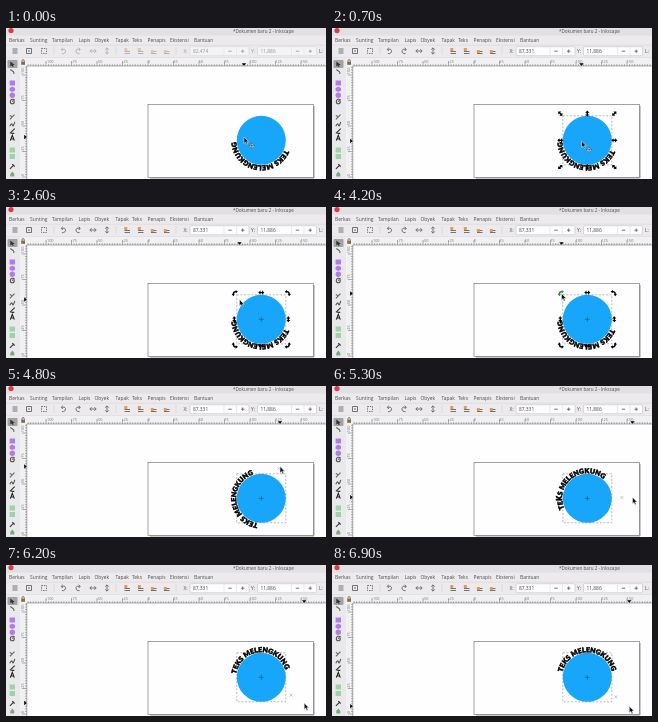
An HTML page for the animation above (7000 ms loop, 320 px wide and 151 px high).

```html
<!DOCTYPE html>
<html lang="id">
<head>
<meta charset="utf-8">
<title>Teks melengkung</title>
<style>
html, body { margin: 0; width: 100%; height: 100%; overflow: hidden; background: #fff; }
svg { display: block; width: 100vw; height: 100vh; }
text { font-family: "Open Sans", "Noto Sans", sans-serif; font-size: 4.9px; fill: #4c4c4c; }
.tiny { font-size: 3.8px; fill: #777; }
.ico { fill: none; stroke: #666; stroke-width: .9; }
.curve { font-family: Lato, sans-serif; font-weight: 900; font-size: 6.9px; fill: #000; stroke: #000; stroke-width: .5; }
</style>
</head>
<body>
<svg id="stage" viewBox="0 0 320 151" preserveAspectRatio="none">
  <rect width="320" height="151" fill="#fefdff"/>

  <g id="page">
    <path d="M308 78V150H144" fill="none" stroke="#999" stroke-width="1"/>
    <rect x="142" y="76.3" width="165.3" height="73" fill="#fefdff" stroke="#666" stroke-width=".6"/>
  </g>

  <circle cx="255.3" cy="112.3" r="24.5" fill="#18a6fb"/>
  <path id="ring" fill="none" d="M280.4 112.3A25.1 25.1 0 0 1 230.2 112.3A25.1 25.1 0 0 1 280.4 112.3"/>
  <g id="label"><text class="curve"><textPath href="#ring">TEKS MELENGKUNG</textPath></text></g>

  <g id="selection">
    <rect x="230.8" y="87.8" width="49" height="49" fill="none" stroke="#777" stroke-width=".5" stroke-dasharray="2 1.6"/>
    <g id="scale"></g>
    <g id="rotate"></g>
    <path id="pivot" d="M252.8 112.3h5M255.3 109.8v5" stroke="#174e75" stroke-width=".6"/>
  </g>
  <path id="snap" d="M-1.5-1.5l3 3M1.5-1.5l-3 3" stroke="#cba5ad" stroke-width=".7"/>

  <g id="chrome">
    <rect width="320" height="30" fill="#eceaed"/>
    <rect width="320" height="7.5" fill="#e2e0e3"/>
    <path d="M0 17.2H320M0 29.7H320" stroke="#d8d6d9" stroke-width=".6"/>
    <circle cx="5" cy="2.6" r="2.6" fill="#dc3b45"/>
    <text x="227" y="4.6" style="font-size:4.55px">*Dokumen baru 2 - Inkscape</text>
    <g id="menu"></g>
    <rect y="30" width="14" height="121" fill="#e9e8ea"/>
    <rect x="14" y="30" width="306" height="8" fill="#f1f0f2"/>
    <rect x="14" y="38" width="7" height="113" fill="#f1f0f2"/>
    <path d="M20.8 151V38H320" fill="none" stroke="#777" stroke-width=".6"/>
    <g id="rulers"></g>
    <rect x="15.2" y="33.8" width="3.8" height="3" fill="#8a6a35"/>
    <path d="M16 34v-1.3a1.1 1.1 0 0 1 2.2 0V34" class="ico"/>
    <g id="bar"></g>
    <g id="tools"></g>
    <path id="markX" d="M-2.2 35.3h4.4L0 37.8z"/>
    <path id="markY" d="M18.2-2.2v4.4L20.7 0z"/>
  </g>

  <g id="cursor">
    <path d="M0 0V6.4L1.5 5.1 2.6 7.4 3.7 6.9 2.7 4.7H4.7z" fill="#111" stroke="#eee" stroke-width=".55"/>
    <g id="move" fill="none">
      <path d="M5 8.7h5.4M7.7 6v5.4" stroke="#fff" stroke-width="1.5"/>
      <path d="M5 8.7h5.4M7.7 6v5.4M7 6.7l.7-.8.7.8M7 10.7l.7.8.7-.8M5.7 8l-.8.7.8.7M9.7 8l.8.7-.8.7" stroke="#222" stroke-width=".6"/>
    </g>
  </g>
</svg>

<script>
const NS = 'http://www.w3.org/2000/svg';
const $ = id => document.getElementById(id);
const LOOP = 7000, STEP = 100;
const CX = 255.3, CY = 112.3, CORNER = 34.6, TEXT_START = 22;
const SELECT = 600, TURN = 1400, GRAB = 4200;

function add(parent, tag, attrs, content) {
  const el = document.createElementNS(NS, tag);
  for (const k in attrs) el.setAttribute(k, attrs[k]);
  if (content !== undefined) el.textContent = content;
  parent.appendChild(el);
  return el;
}
const icon = (parent, x, y, d, attrs = {}) =>
  add(parent, 'path', { class: 'ico', d, transform: `translate(${x} ${y})`, ...attrs });

function buildMenu() {
  const items = { Berkas: 3, Sunting: 24, Tampilan: 46, Lapis: 72.5, Obyek: 88.5,
    Tapak: 109.5, Teks: 126, Penapis: 141.5, Ekstensi: 164, Bantuan: 188 };
  for (const name in items) add($('menu'), 'text', { x: items[name], y: 14 }, name);
}

function buildRulers() {
  const g = $('rulers'), unit = 1.02;
  let d = '';
  for (let mm = -117.5; mm <= 175; mm += 2.5) {
    const x = 142 + mm * unit;
    d += `M${x} 38v${mm % 25 ? -1.8 : -5}`;
    if (mm % 25 === 0) add(g, 'text', { x: x - .2, y: 35, class: 'tiny' }, mm);
  }
  for (let mm = 0; mm <= 107.5; mm += 2.5) {
    const y = 149 - mm * unit;
    d += `M20.8 ${y}h${mm % 25 ? -1.8 : -5}`;
    if (mm % 25 === 0)
      add(g, 'text', { class: 'tiny', transform: `translate(18 ${y - .8}) rotate(-90)` }, mm);
  }
  add(g, 'path', { d, stroke: '#666', 'stroke-width': .5 });
}

let actions, fieldX, fieldY;
function buildBar() {
  const bar = $('bar');
  icon(bar, 9, 23, 'M-2.5-2h5M-2.5 0h5M-2.5 2h5');
  icon(bar, 23, 23, 'M-2.5-2.5h5v5h-5zM-1 0h2');
  icon(bar, 38, 23, 'M-2.5-2.5h5v5h-5z', { 'stroke-dasharray': '1.4 1' });
  actions = add(bar, 'g', {});
  icon(actions, 57.5, 23, 'M-1.6 2.6H0Q2.4 2 2-.4T-2-1.6M-.7-3.2l-1.6 1.6 1.6 1.6');
  icon(actions, 72, 23, 'M1.6 2.6H0Q-2.4 2-2-.4T2-1.6M.7-3.2l1.6 1.6L.7 0');
  icon(actions, 87, 23, 'M-3 0H3M-1.4-1.8L-3.2 0l1.8 1.8M1.4-1.8L3.2 0 1.4 1.8');
  icon(actions, 101, 23, 'M0-3V3M-1.8-1.4L0-3.2l1.8 1.8M-1.8 1.4L0 3.2l1.8-1.8');
  [121, 134.5, 147.5, 160.5].forEach((x, i) => {
    icon(actions, x, 23, 'M-2.5 2.5h5.5M-2.5 .5h5.5');
    add(actions, 'rect', { x: x - 2.7, y: i < 2 ? 20 : 22, width: 3, height: 3, fill: '#e39a5c' });
  });
  add(bar, 'path', { d: 'M48 19v8M110 19v8M170 19v8', stroke: '#d2d0d3', 'stroke-width': .6 });
  const field = (name, x) => {
    const g = add(bar, 'g', {});
    add(g, 'text', { x: x - 6.5, y: 25 }, name);
    add(g, 'rect', { x, y: 18.7, width: 59, height: 9, rx: 1.2, fill: '#fcfbfd', stroke: '#c4c4c4', 'stroke-width': .6 });
    add(g, 'path', { d: `M${x + 34} 19v8.4M${x + 46.5} 19v8.4`, stroke: '#d8d8d8', 'stroke-width': .5 });
    icon(g, x + 40, 23.2, 'M-1.7 0h3.4');
    icon(g, x + 52.7, 23.2, 'M-1.7 0h3.4M0-1.7v3.4');
    return { g, value: add(g, 'text', { x: x + 3, y: 25 }, '11,886') };
  };
  fieldX = field('X:', 184);
  fieldY = field('Y:', 251.5);
  add(bar, 'text', { x: 313, y: 25 }, 'L:');
}

function buildTools() {
  const g = $('tools');
  const fill = c => ({ style: `fill:${c};stroke:none` });
  const line = c => ({ style: `stroke:${c};stroke-width:1.1` });
  const purple = fill('#b27bea');
  add(g, 'rect', { x: 1.5, y: 32, width: 10, height: 8, rx: 1, fill: '#a3a2a5' });
  icon(g, 6.3, 36, 'M-2-2.5V2.5L-.6 1.4 .4 3 1.4 2.5.7 1H2.5z', fill('#333'));
  icon(g, 6.3, 43.5, 'M-2-2L1.5 .5M1.5 .5v2', line('#666'));
  icon(g, 6.3, 55, 'M-2.7-2.5h5.4v5h-5.4z', purple);
  icon(g, 6.3, 61.3, 'M-2.7-1.3L0-2.7 2.7-1.3V1.5L0 2.8-2.7 1.5z', purple);
  icon(g, 6.3, 67.3, 'M-2.7 0a2.7 2.7 0 1 0 5.4 0a2.7 2.7 0 1 0-5.4 0z', purple);
  icon(g, 6.3, 73.7, 'M0 0a1 1 0 0 1 2 0a2 2 0 0 1-4 0a2.4 2.4 0 0 1 4.4-1.4', line('#555'));
  icon(g, 6.3, 89, 'M-2.4 2.4L2.2-2.4M-2.5-1.5l2 1', line('#666'));
  icon(g, 6.3, 96, 'M-2.5 2.2q2-4 2.6-1.2T2.5-2.2', line('#555'));
  icon(g, 6.3, 103, 'M-2.4 2.4L2.4-2.4M-1 2.4h3', line('#333'));
  icon(g, 6.3, 110, 'M-2 2.6L0-2.6 2 2.6M-1.3 1h2.6', line('#222'));
  const green = fill('#9dd4a5');
  icon(g, 6.3, 122, 'M-2.7-2.5h5.4v5h-5.4z', green);
  icon(g, 6.3, 128.5, 'M-2.7-2.5h5.4v5h-5.4z', green);
  icon(g, 6.3, 138.5, 'M-2.4 2.4L1.6-1.6M0-2.4L2.4 0', line('#333'));
  icon(g, 6.3, 146, 'M-2 2.4h4V0L0-2.4-2 0z', fill('#77a982'));
}

function buildHandles() {
  const arrow = 'M-3 0L-.8-2.1V-.7H.8V-2.1L3 0 .8 2.1V.7H-.8V2.1z';
  const bend = 'M-3.2 2L-2.9-.9-2-.2Q0-2.2 2-.2L2.9-.9 3.2 2 .6 1.5 1.3.9Q0 0-1.3.9L-.6 1.5z';
  for (let i = -1; i <= 1; i++) for (let j = -1; j <= 1; j++) {
    if (!i && !j) continue;
    const at = `translate(${CX + i * 27} ${CY + j * 26.7})`;
    const angle = Math.atan2(j, i) * 180 / Math.PI;
    add($('scale'), 'path', { d: arrow, transform: `${at} rotate(${angle})` });
    const corner = i && j;
    const el = add($('rotate'), 'path', { d: corner ? bend : arrow,
      transform: `${at} rotate(${corner ? angle + 90 : i ? 90 : 0})` });
    if (i < 0 && j < 0) el.id = 'grip';
  }
}

// time, x, y of the pointer tip
const PATH = [
  [0, 238, 109], [400, 249.5, 113], [2100, 249.5, 113], [2600, 233.5, 92.5],
  [3000, 233.5, 92.5], [3900, 229.5, 86.5], [4200, 229.5, 86.5], [4500, 239, 77],
  [4700, 262, 72], [4900, 286, 89], [5100, 298, 103], [5300, 300.5, 111.3],
  [5700, 300.5, 130], [6200, 298.2, 138], [6900, 297.3, 141.3]
];

function pointer(t) {
  const i = PATH.findIndex(k => k[0] > t);
  if (i < 0) return PATH[PATH.length - 1].slice(1);
  const [a, b] = [PATH[i - 1], PATH[i]];
  const p = (t - a[0]) / (b[0] - a[0]);
  return [a[1] + (b[1] - a[1]) * p, a[2] + (b[2] - a[2]) * p];
}

const show = (el, on) => { el.style.display = on ? '' : 'none'; };
const heading = (x, y) => Math.atan2(y - CY, x - CX);
const grabAngle = heading(...pointer(GRAB));

function draw(t) {
  const [x, y] = pointer(t);
  const selected = t >= SELECT, turning = t >= TURN, dragging = t > GRAB;
  $('cursor').setAttribute('transform', `translate(${x} ${y})`);
  $('markX').setAttribute('transform', `translate(${x} 0)`);
  $('markY').setAttribute('transform', `translate(0 ${y})`);
  show($('move'), t < 2500);

  show($('selection'), selected);
  show($('scale'), !turning);
  show($('rotate'), turning && !dragging);
  show($('pivot'), turning);
  $('grip').style.fill = t >= 3900 ? '#2c8a35' : '#000';

  const turn = dragging ? heading(x, y) - grabAngle : 0;
  $('label').setAttribute('transform', `rotate(${TEXT_START + turn * 180 / Math.PI} ${CX} ${CY})`);
  const a = turn + Math.PI * 1.25;
  show($('snap'), dragging);
  $('snap').setAttribute('transform', `translate(${CX + CORNER * Math.cos(a)} ${CY + CORNER * Math.sin(a)})`);

  actions.style.opacity = selected ? 1 : .45;
  fieldX.g.style.opacity = fieldY.g.style.opacity = selected ? 1 : .55;
  fieldX.value.textContent = selected ? '87,331' : '82,474';
}

buildMenu();
buildRulers();
buildBar();
buildTools();
buildHandles();

const start = performance.now();
function tick() {
  const t = (performance.now() - start) % LOOP;
  draw(Math.floor(t / STEP) * STEP);
  requestAnimationFrame(tick);
}
draw(0);
requestAnimationFrame(tick);
</script>
</body>
</html>
```
